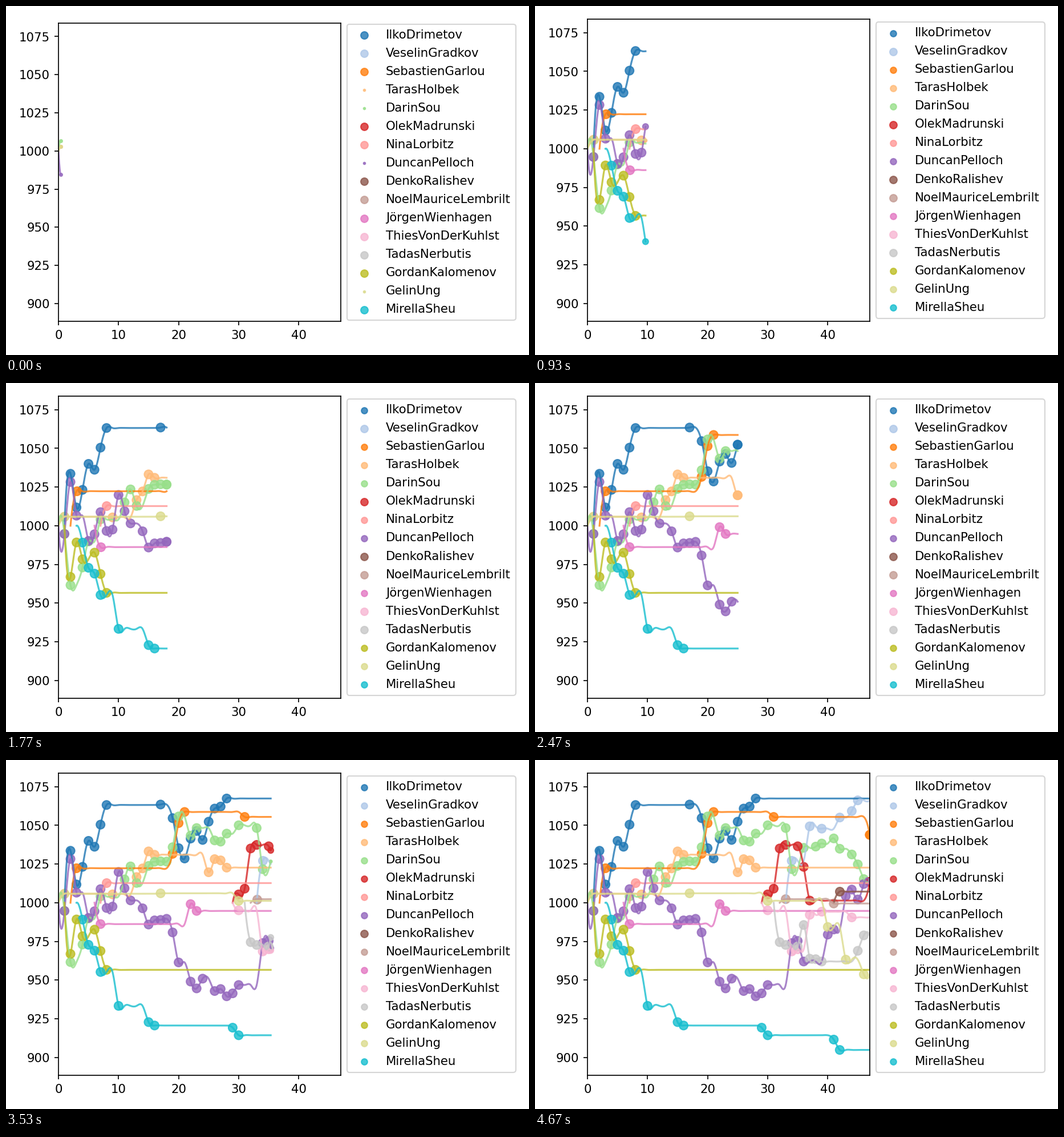
A matplotlib script that plays this animation: 917x611 px, repeating every 7.71 s.

```python
import matplotlib.pyplot as plt
import numpy as np
from matplotlib.animation import FuncAnimation

W, H, DPI = 917, 611, 152.8
TICK, TICKS = 30, 257          # ms per redraw, redraws per loop
STEPS, PER_ROUND = 141, 3      # motion steps, steps per round
FINE = 15                      # curve samples per round
FULL, IDLE = 50, 36            # marker areas

NAMES = [
    "IlkoDrimetov", "VeselinGradkov", "SebastienGarlou", "TarasHolbek",
    "DarinSou", "OlekMadrunski", "NinaLorbitz", "DuncanPelloch",
    "DenkoRalishev", "NoelMauriceLembrilt", "JörgenWienhagen",
    "ThiesVonDerKuhlst", "TadasNerbutis", "GordanKalomenov",
    "GelinUng", "MirellaSheu",
]

# One match per round: winners, losers, points won. Letters follow NAMES.
MATCHES = [
    ("DO", "EH", 5.8), ("AH", "EN", 33.6), ("CN", "AH", 22.3),
    ("AE", "NP", 11.4), ("AE", "HP", 16.8), ("HN", "AP", 4.3),
    ("AHE", "NPK", 14.3), ("AG", "HN", 12.7), ("H", "D", 0.9),
    ("H", "P", 22.4), ("E", "H", 11), ("E", "H", 8.4),
    ("D", "E", 11.2), ("D", "H", 5.6), ("DE", "HP", 11),
    ("EH", "DP", 2.7), ("AEHO", "", 0.3), ("H", "E", 0.7),
    ("CE", "AH", 9.3), ("CE", "AH", 19.9), ("C", "A", 7.2),
    ("AK", "EH", 12.9), ("AE", "HK", 4.9), ("H", "A", 6.3),
    ("A", "D", 11.8), ("AD", "EH", 8.5), ("AH", "DE", 1.3),
    ("AE", "DH", 5.2), ("H", "P", 1.9), ("EHF", "POL", 5.4),
    ("F", "C", 3.7), ("F", "M", 26), ("FJ", "EM", 2.3),
    ("BH", "EL", 27.1), ("HL", "FM", 1.4), ("EM", "FH", 13.8),
    ("BL", "FM", 22.3), ("E", "M", 0.8), ("EL", "BM", 2),
    ("H", "O", 17.4), ("EH", "JP", 3.3), ("BI", "EP", 7.2),
    ("H", "O", 21.6), ("BH", "EL", 4.2), ("BM", "EH", 6.9),
    ("HM", "EO", 10), ("F", "C", 12.1),
]
ROUNDS = len(MATCHES)


def spline(y):
    """Sample the not-a-knot cubic spline through unit-spaced values."""
    n, d = len(y), np.diff(y)
    m, r = np.zeros((n, n)), np.zeros(n)
    for i in range(1, n - 1):
        m[i, i - 1:i + 2] = 1, 4, 1
        r[i] = 3 * (d[i - 1] + d[i])
    m[0, :2] = 1, 2
    m[-1, -2:] = 2, 1
    r[0] = (5 * d[0] + d[1]) / 2
    r[-1] = (5 * d[-1] + d[-2]) / 2
    s = np.linalg.solve(m, r)

    u = np.arange((n - 1) * FINE + 1) / FINE
    i = np.minimum(u.astype(int), n - 2)
    t = u - i
    rise = t * t * (3 - 2 * t)
    return (y[i] + d[i] * rise + s[i] * t * (1 - t) ** 2
            + s[i + 1] * t * t * (t - 1))


class Player:
    def __init__(self, ax, index, name):
        letter = chr(ord("A") + index)
        rating = [1000.0]
        self.played = np.zeros(ROUNDS + 1, bool)
        for rnd, (won, lost, gain) in enumerate(MATCHES, 1):
            change = gain * (letter in won) - (gain - 0.5) * (letter in lost)
            rating.append(rating[-1] + change)
            self.played[rnd] = letter in won + lost
        self.rating = np.array(rating)
        self.start = int(np.argmax(self.played)) - 1
        self.curve = spline(self.rating[self.start:])
        self.xs = self.start + np.arange(len(self.curve)) / FINE

        color = plt.get_cmap("tab20")(index / len(NAMES))
        self.line, = ax.plot([], [], color=color, alpha=0.8)
        self.dots = ax.scatter([], [], color=[color], alpha=0.8, label=name)

    def tip_size(self, rnd, frac):
        size = FULL * (1 - frac) ** 2 * self.played[rnd]
        if frac:
            size = max(size, FULL * frac ** 2 * self.played[rnd + 1])
        return size

    def show(self, step, key):
        rnd, part = divmod(step, PER_ROUND)
        if step <= self.start * PER_ROUND:
            self.line.set_data([], [])
            self.dots.set_offsets(np.empty((0, 2)))
            key.set_sizes([IDLE])
            return
        end = step * FINE // PER_ROUND - self.start * FINE
        self.line.set_data(self.xs[:end + 1], self.curve[:end + 1])

        done = np.flatnonzero(self.played[:rnd + 1])
        spots = [(x, self.rating[x]) for x in done]
        sizes = [FULL] * len(done)
        tip = self.tip_size(rnd, part / PER_ROUND)
        if tip > 0:
            spots.append((self.xs[end], self.curve[end]))
            sizes.append(tip)
        self.dots.set_offsets(np.array(spots).reshape(-1, 2))
        self.dots.set_sizes(sizes)
        key.set_sizes([max(sizes, default=0) / 2])


def place(top):
    left, right, bottom = 92, 587, 552
    ax.set_position([left / W, 1 - bottom / H,
                     (right - left) / W, (bottom - top) / H])


fig = plt.figure(figsize=((W + 0.01) / DPI, (H + 0.01) / DPI), dpi=DPI)
ax = fig.add_axes([0.1, 0.1, 0.5, 0.8])
players = [Player(ax, i, name) for i, name in enumerate(NAMES)]
ax.set_xlim(0, ROUNDS)
ax.set_ylim(888.4, 1083.8)
legend = ax.legend(loc="center left", bbox_to_anchor=(1, 0.5),
                   labelspacing=0.567, borderpad=0.42)


def draw(tick):
    step = min(STEPS, 1 + int((tick * TICK + 23) * 0.03))
    place(30 if step == 1 else 23)
    for player, key in zip(players, legend.legend_handles):
        player.show(step, key)
    return []


anim = FuncAnimation(fig, draw, frames=TICKS, interval=TICK,
                     init_func=lambda: [], repeat=True)
plt.show()
```
